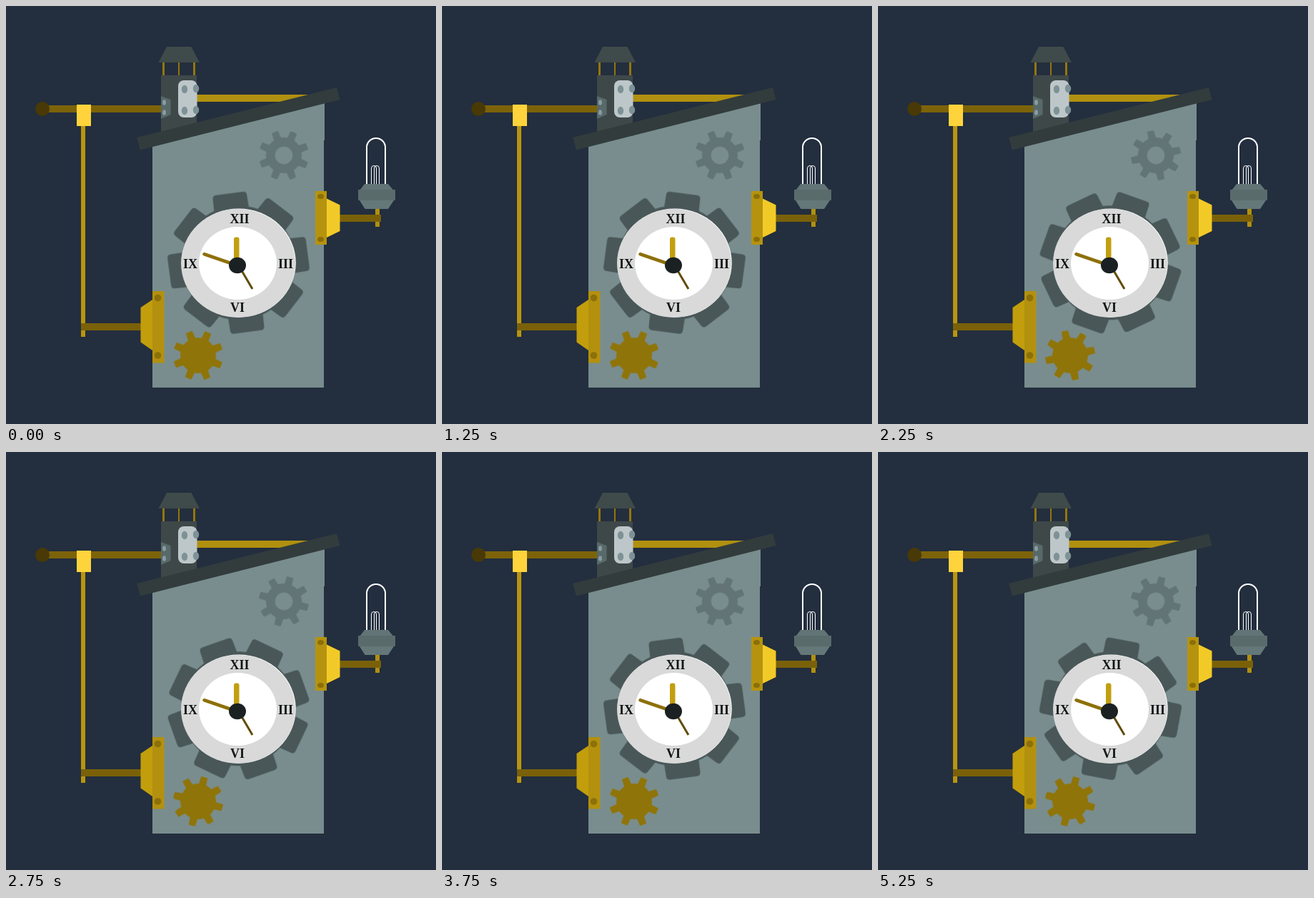
An HTML page that plays this animation: 602 by 585 pixels, repeating every 5.5 s.

```html
<!DOCTYPE html>
<html lang="en">
<head>
<meta charset="utf-8">
<title>Clockwork house</title>
<style>
  html, body { margin: 0; width: 100%; height: 100%; overflow: hidden; background: #232e3e; }
  svg { display: block; width: 100%; height: 100%; }
  text { font: bold 18px "Liberation Serif", "Times New Roman", serif; text-anchor: middle; fill: #111515; }
  .spin { transform-origin: 0 0; }
</style>
</head>
<body>
<svg viewBox="0 0 602 585">
  <rect width="602" height="585" fill="#232e3e"/>

  <!-- house -->
  <path d="M205 190L446 130V188H445V534H205Z" fill="#798d8e"/>

  <!-- left crank -->
  <rect x="51" y="139" width="166" height="10" fill="#7c630a"/>
  <circle cx="51" cy="144" r="10" fill="#493906"/>
  <rect x="105" y="150" width="6" height="313" fill="#b8950f"/>
  <rect x="99" y="138" width="20" height="30" fill="#ffd33c"/>
  <rect x="105" y="444" width="84" height="10" fill="#7a6109"/>
  <path d="M188.500 422L205 411V482L188.500 470.500Z" fill="#c29e0c"/>
  <rect x="205" y="399" width="16.500" height="100.500" fill="#b3900e"/>
  <g fill="#8c7009">
    <circle cx="212.500" cy="408.500" r="4.800"/>
    <circle cx="212.500" cy="489" r="4.800"/>
  </g>

  <!-- tower -->
  <rect x="267" y="124" width="170" height="10" fill="#b0900f"/>
  <g fill="#94760b">
    <rect x="219" y="78" width="3" height="20"/>
    <rect x="241" y="78" width="2" height="20"/>
    <rect x="262" y="78" width="3" height="20"/>
  </g>
  <path d="M225 57H259.500L271 79H213.500Z" fill="#3f4a4a"/>
  <rect x="217" y="97" width="50" height="85" fill="#3e4849"/>
  <path d="M217 126L230.500 131V152L217 158Z" fill="#586969"/>
  <g fill="#8a9ba2">
    <ellipse cx="221.500" cy="135" rx="2.500" ry="3.800"/>
    <ellipse cx="221.500" cy="149" rx="2.500" ry="3.800"/>
  </g>
  <rect x="241" y="104" width="26.500" height="52" rx="8" fill="#bdc7ca"/>
  <g fill="#7e9296">
    <ellipse cx="250" cy="116.500" rx="4.200" ry="5.800"/>
    <ellipse cx="266" cy="115.500" rx="4.200" ry="5.800"/>
    <ellipse cx="250" cy="146.500" rx="4.200" ry="5.800"/>
    <ellipse cx="266" cy="145.500" rx="4.200" ry="5.800"/>
  </g>
  <path d="M183 184L463 114L467.500 131L188 201.500Z" fill="#323c3d"/>

  <!-- lamp -->
  <rect x="517" y="283" width="6" height="26" fill="#b0900f"/>
  <rect x="467" y="292" width="58" height="10" fill="#7a6109"/>
  <path d="M449 269.500L467.500 278.500V315L449 324Z" fill="#f2ca28"/>
  <rect x="433" y="259" width="16" height="75" fill="#b6930f"/>
  <g fill="#8a6f09">
    <ellipse cx="440.500" cy="266.500" rx="4.500" ry="3.600"/>
    <ellipse cx="440.500" cy="326.500" rx="4.500" ry="3.600"/>
  </g>
  <g fill="none" stroke="#fff">
    <path d="M505 250V198A13 13 0 0 1 531 198V250" stroke-width="2"/>
    <path d="M511.500 250V227A3.500 3.500 0 0 1 518.500 227V250M515.500 250V227A3.500 3.500 0 0 1 522.500 227V250"/>
  </g>
  <path d="M502 249H535L542 257.500H495.500Z" fill="#627475"/>
  <rect x="493" y="257" width="52" height="15" fill="#596b6b"/>
  <path d="M495 272H543L535 284H502.500Z" fill="#647879"/>

  <g id="gears"></g>

  <!-- clock -->
  <ellipse cx="325.800" cy="359.500" rx="80" ry="76" fill="#fff"/>
  <ellipse cx="325" cy="360" rx="80" ry="76" fill="#d9d9d9"/>
  <ellipse cx="324.500" cy="360" rx="54.500" ry="51" fill="#fff"/>
  <text x="327" y="304">XII</text>
  <text x="391.500" y="367">III</text>
  <text x="324" y="428">VI</text>
  <text x="258" y="367">IX</text>
  <rect x="319" y="323.500" width="7.500" height="40" rx="3" fill="#c29f10"/>
  <path d="M277.500 347.300L322 362.500" stroke="#8d7009" stroke-width="4.600" stroke-linecap="round"/>
  <path d="M325 362L345 396" stroke="#614c07" stroke-width="3"/>
  <ellipse cx="324" cy="363" rx="12" ry="11.200" fill="#1b2122"/>
</svg>
<script>
  const NS = "http://www.w3.org/2000/svg";
  const LOOP = 5500, STEPS = 22;

  function add(parent, tag, attrs) {
    const el = document.createElementNS(NS, tag);
    for (const key in attrs) el.setAttribute(key, attrs[key]);
    return parent.appendChild(el);
  }

  // start and step are degrees; the gear ticks once per step
  function gear({ x, y, body, outer, base, tip, round, hole, fill, start, step }) {
    const place = add(document.getElementById("gears"), "g", { transform: `translate(${x} ${y})` });
    const spin = add(place, "g", { class: "spin", fill });
    const b = base / 2, t = tip / 2, inner = body - 4;
    const tooth = `M${-b} ${-inner}L${-t} ${round - outer}Q${-t} ${-outer} ${round - t} ${-outer}` +
      `H${t - round}Q${t} ${-outer} ${t} ${round - outer}L${b} ${-inner}Z`;
    for (let i = 0; i < 8; i++) add(spin, "path", { d: tooth, transform: `rotate(${i * 45})` });
    if (hole) {
      add(spin, "circle", { r: (body + hole) / 2, fill: "none", stroke: fill, "stroke-width": body - hole });
    } else {
      add(spin, "circle", { r: body });
    }
    spin.animate(
      [{ transform: `rotate(${start}deg)` }, { transform: `rotate(${start + step * STEPS}deg)` }],
      { duration: LOOP, iterations: Infinity, easing: `steps(${STEPS}, end)` }
    );
  }

  const small = { body: 25, outer: 35, base: 11, tip: 9.5, round: 1, start: 23.5, step: -9 };
  gear({ x: 325.5, y: 359.3, body: 80, outer: 97.7, base: 49, tip: 48, round: 5,
         fill: "#495758", start: -7.5, step: 3 });
  gear({ ...small, x: 389, y: 209, hole: 12.3, fill: "#627475" });
  gear({ ...small, x: 269, y: 489, fill: "#8f7409" });
</script>
</body>
</html>
```
